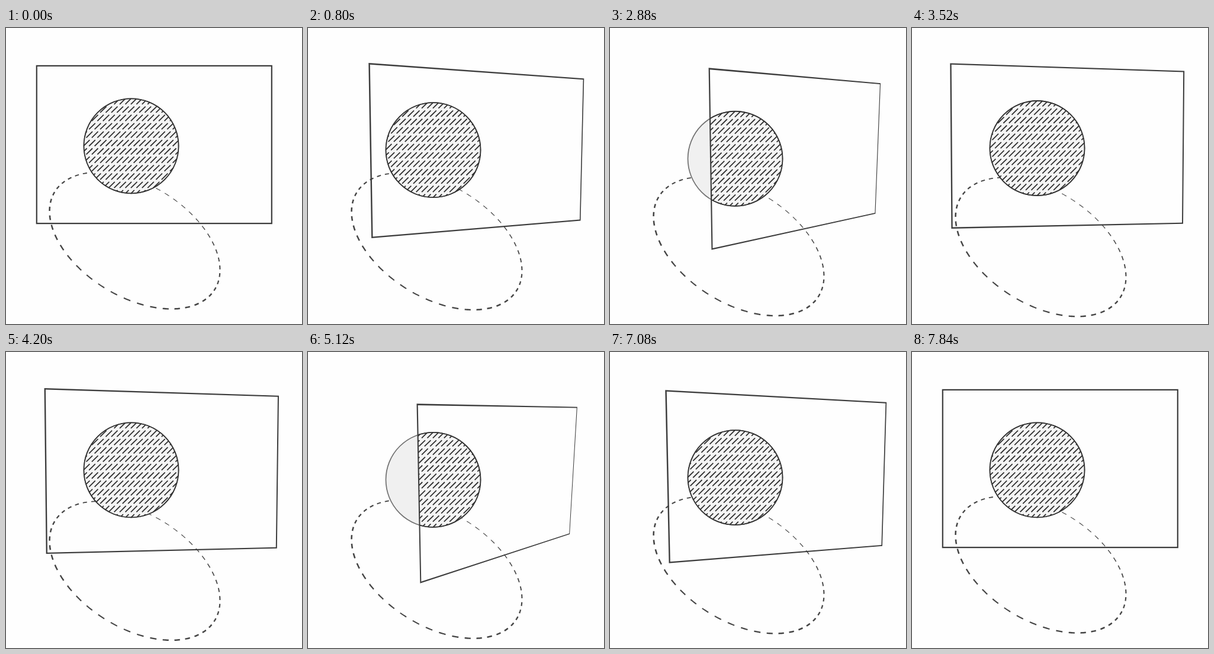
An HTML page with a canvas for the animation above (7880 ms loop, 500 by 500 pixels).

```html
<!DOCTYPE html>
<html lang="en">
<head>
<meta charset="utf-8">
<title>Plane, ball and orbit</title>
<style>
html, body { margin: 0; width: 100%; height: 100%; overflow: hidden; background: #fefefe; }
canvas { display: block; width: 500px; height: 500px; }
</style>
</head>
<body>
<canvas id="stage"></canvas>
<script>
const LOOP = 7880, HALF = LOOP / 2, TAU = Math.PI * 2;
const canvas = document.getElementById('stage');
const ctx = canvas.getContext('2d');
const ratio = window.devicePixelRatio || 1;
canvas.width = canvas.height = 500 * ratio;

// Monotone cubic curve through [time, value] keys.
function curve(keys) {
  const slope = keys.slice(1).map((k, i) => (k[1] - keys[i][1]) / (k[0] - keys[i][0]));
  const tangent = keys.map((_, i) => {
    const a = slope[i - 1], b = slope[i];
    return a * b > 0 ? 2 * a * b / (a + b) : 0;
  });
  return t => {
    let i = 0;
    while (i < keys.length - 2 && t > keys[i + 1][0]) i++;
    const [t0, v0] = keys[i], [t1, v1] = keys[i + 1], h = t1 - t0;
    const s = Math.min(1, Math.max(0, (t - t0) / h)), r = 1 - s;
    return v0 * (1 + 2 * s) * r * r + tangent[i] * h * s * r * r
         + v1 * s * s * (3 - 2 * s) - tangent[i + 1] * h * s * s * r;
  };
}

const swing = curve([
  [0, 0], [400, .085], [820, .32], [1600, .89], [1990, .98], [2400, .88],
  [2880, .534], [3220, .29], [3600, .08], [3950, 0], [4000, .012], [4200, .162],
  [4820, .62], [5120, .82], [5800, 1], [6320, .9], [6400, .848],
  [7240, .28], [7600, .08], [7840, 0], [LOOP, 0]
]);
const drop = curve([
  [0, 0], [260, .1], [700, 5], [1180, 16.5], [1600, 29.5], [2060, 34],
  [2380, 33], [2880, 21.5], [3400, 5.5], [HALF, 0]
]);

// Projects a corner of the plane, which turns about a pivot behind it.
function project(x, y, turn, tilt) {
  const pivot = 145, depth = 690;
  const px = x * Math.cos(turn) + pivot * Math.sin(turn);
  const pz = pivot * Math.cos(turn) - x * Math.sin(turn);
  const py = y * Math.cos(tilt) + pz * Math.sin(tilt);
  const z = pz * Math.cos(tilt) - y * Math.sin(tilt) - pivot;
  const s = depth / (depth - z);
  return [250 + (px + .3) * s, 250 + (py - 53) * s];
}

function quad(path, inset, turn, tilt) {
  const w = 198.5 - inset, h = 133.2 - inset;
  [[-w, -h], [w, -h], [w, h], [-w, h]].forEach(([x, y], i) => {
    const p = project(x, y, turn, tilt);
    i ? path.lineTo(...p) : path.moveTo(...p);
  });
  path.closePath();
}

function drawOrbit(t) {
  const phase = TAU * t / LOOP;
  const bob = (1 - Math.cos(phase + .2 * Math.sin(phase / 2))) / 2;
  const cx = 217.5, cy = 359.1 + 10.9 * bob, stretch = 1 + .017 * bob;
  const lean = 31.3 * Math.PI / 180, c = Math.cos(lean), s = Math.sin(lean);
  const near = u => 2 * Math.atan2(1.2 * Math.sin(u / 2), Math.cos(u / 2));
  const at = v => {
    const a = 158.3 * Math.sin(v), b = 94.8 * Math.cos(v);
    return [cx + a * c - b * s, cy + (a * s + b * c) * stretch];
  };
  const count = 48, step = TAU / count;
  ctx.strokeStyle = '#444';
  for (let i = 0; i < count; i++) {
    const from = (i + .4) * step - Math.PI;
    const mid = near(from + step / 4);
    ctx.lineWidth = 2.4 * Math.hypot(Math.sin(mid), .64 * Math.cos(mid)) * (1 + .3 * Math.cos(mid));
    ctx.beginPath();
    for (let j = 0; j <= 4; j++) ctx.lineTo(...at(near(from + step * j / 8)));
    ctx.stroke();
  }
}

function circle(x, y) {
  ctx.beginPath();
  ctx.arc(x, y, 80, 0, TAU);
}

function drawBall(x, y, plane) {
  circle(x, y);
  ctx.fillStyle = '#f0f0f0';
  ctx.fill();
  ctx.strokeStyle = '#707070';
  ctx.lineWidth = 1.7;
  ctx.stroke();

  ctx.save();
  ctx.clip(plane);
  ctx.save();
  circle(x, y);
  ctx.clip();
  ctx.fillStyle = '#f4f4f4';
  ctx.fill();
  ctx.strokeStyle = '#303030';
  ctx.lineWidth = 1.8;
  ctx.beginPath();
  const row = 14.14, gap = row * 2 / 3;
  for (let j = -6; j <= 6; j++) {
    const ry = y - 5 + j * row, shift = (-j * row) % gap;
    for (let i = -11; i <= 11; i++) {
      const rx = x + i * gap + shift;
      ctx.moveTo(rx - 5.3, ry + 5.2);
      ctx.lineTo(rx + 5.3, ry - 5.2);
    }
  }
  ctx.stroke();
  ctx.restore();
  circle(x, y);
  ctx.strokeStyle = '#303030';
  ctx.lineWidth = 1.8;
  ctx.stroke();
  ctx.restore();
}

function draw(t) {
  const amount = swing(t);
  const turn = amount * (t < 3950 ? 70 : 50) * Math.PI / 180;
  const tilt = amount * 14.5 * Math.PI / 180;
  ctx.setTransform(ratio, 0, 0, ratio, 0, 0);
  ctx.fillStyle = '#fefefe';
  ctx.fillRect(0, 0, 500, 500);
  drawOrbit(t);

  const plane = new Path2D(), border = new Path2D();
  quad(plane, 0, turn, tilt);
  quad(border, -1.1, turn, tilt);
  quad(border, 1.1, turn, tilt);
  drawBall(211.5, 199.3 + drop(t % HALF), plane);
  ctx.fillStyle = '#3c3c3c';
  ctx.fill(border, 'evenodd');
}

const start = performance.now();
function frame() {
  draw((performance.now() - start) % LOOP);
  requestAnimationFrame(frame);
}
frame();
</script>
</body>
</html>
```
